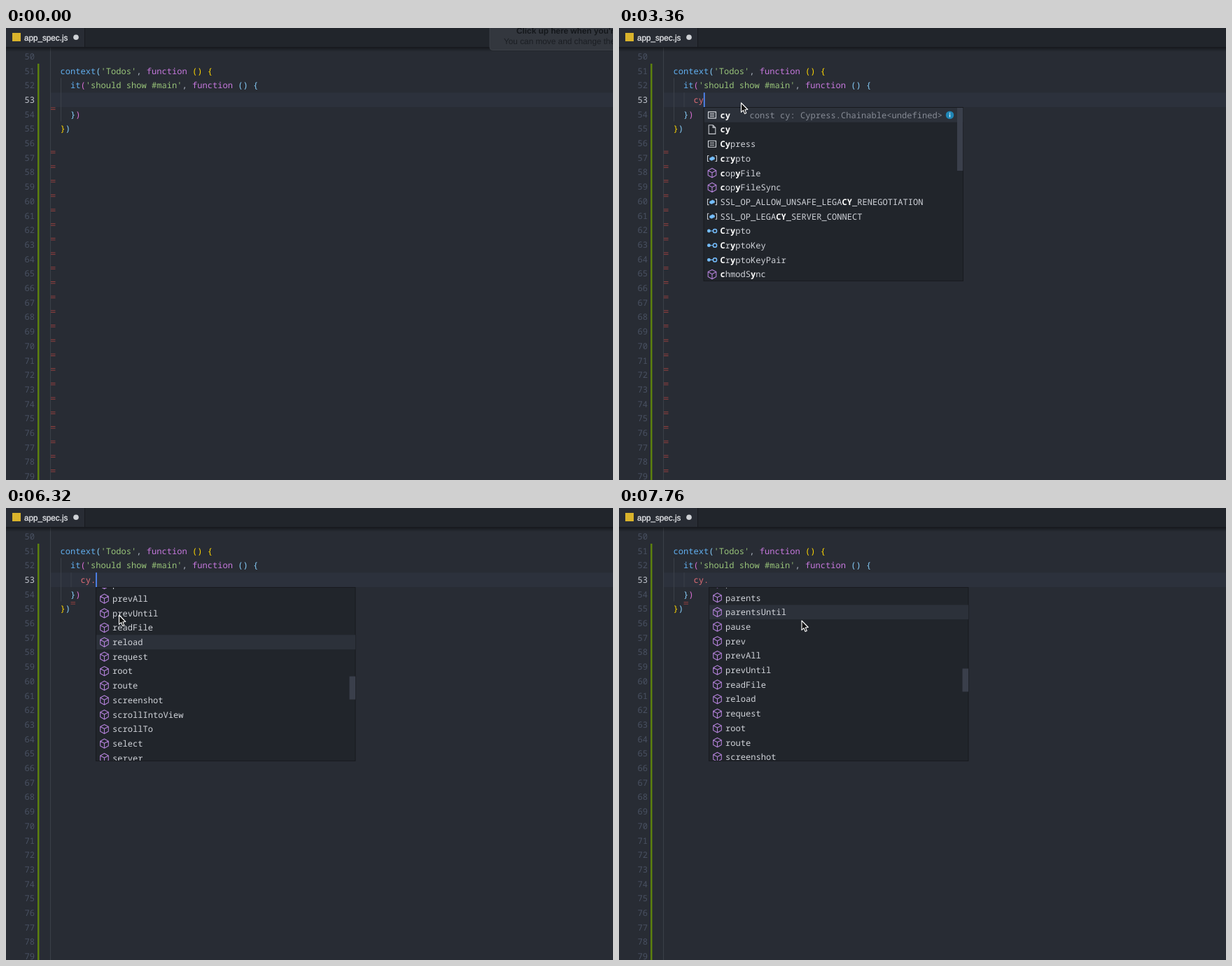
Animation of 867x646 px, one loop 8 s. Source, as an HTML page:

```html
<!DOCTYPE html>
<html lang="en">
<head>
<meta charset="utf-8">
<title>Editor autocomplete</title>
<style>
html, body { margin: 0; width: 100%; height: 100%; overflow: hidden; background: #282c34; }
svg { display: block; }
text { white-space: pre; text-rendering: geometricPrecision; font: 500 12.08px "Noto Sans Mono", "DejaVu Sans Mono", monospace; }
.ui { font-family: "Liberation Sans", Arial, sans-serif; font-weight: 400; }
.num { font-weight: 400; }
</style>
</head>
<body>
<svg id="stage" width="867" height="646" viewBox="0 0 867 646">
  <defs>
    <linearGradient id="shade" x2="0" y2="1">
      <stop offset="0" stop-color="#000" stop-opacity=".4"/>
      <stop offset="1" stop-color="#000" stop-opacity="0"/>
    </linearGradient>
  </defs>
</svg>
<script>
const LOOP = 8000, STEP = 80, LINE = 20.7, CHAR = 7.25;
const stage = document.getElementById('stage');
const C = {
  blue: '#61afef', sky: '#87cefa', gold: '#ffd700', pink: '#da70d6', purple: '#c678dd',
  green: '#98c379', red: '#e06c75', grey: '#abb2bf', cube: '#b180d7', icon: '#75beff',
  panel: '#21252b', row: '#2c313a', edge: '#181a1f', mark: '#93403f'
};

function el(parent, tag, attrs, content) {
  const node = document.createElementNS('http://www.w3.org/2000/svg', tag);
  for (const k in attrs) node.setAttribute(k, attrs[k]);
  if (content !== undefined) node.textContent = content;
  parent.append(node);
  return node;
}
const rect = (p, x, y, width, height, fill) => el(p, 'rect', { x, y, width, height, fill });
const path = (p, d, stroke, fill = 'none', width = 1.1) =>
  el(p, 'path', { d, stroke, fill, 'stroke-width': width, 'stroke-linejoin': 'round' });
const text = (p, x, mid, fill, s, more) => el(p, 'text', { x, y: mid + 4.3, fill, ...more }, s);
const midOf = n => 40.5 + LINE * (n - 50);
const show = (node, on) => node.setAttribute('visibility', on ? 'visible' : 'hidden');
const move = (node, x, y) => node.setAttribute('transform', `translate(${x} ${y})`);

function tokens(x, line, parts) {
  const node = text(stage, x, midOf(line), C.grey, '');
  for (const [fill, s] of parts) el(node, 'tspan', { fill }, s);
}
function mark(p, x, y) {
  rect(p, x, y - 1.5, 6.5, 1, C.mark);
  rect(p, x, y + 1, 6.5, 1, C.mark);
}

// Editor
rect(stage, 0, 0, 867, 646, '#282c34');
rect(stage, 64, 92.3, 803, LINE, '#2c313c');
rect(stage, 63, 28, 1, 618, '#3b4048');
rect(stage, 45, 51, 2.5, 595, '#5c800e');
rect(stage, 78, 71.5, 1, 62, '#3b4048');
const guide = rect(stage, 92.5, 92.3, 1, LINE, '#3b4048');
for (let n = 50; n < 80; n++)
  text(stage, 41, midOf(n), n === 53 ? '#c2c6ce' : '#495162', n, { 'text-anchor': 'end', class: 'num' });

const lineMark = el(stage, 'g'), wordMark = el(stage, 'g'), blankMarks = el(stage, 'g'), endMark = el(stage, 'g');
mark(lineMark, 64, 115);
mark(wordMark, 107, 115);
mark(endMark, 92.5, 135.7);
for (let n = 56; n < 79; n++) mark(blankMarks, 64, midOf(n) + 12.5);

tokens(77.6, 51, [[C.blue, 'context'], [C.sky, '('], [C.green, "'Todos'"], [C.grey, ', '],
  [C.purple, 'function '], [C.gold, '() {']]);
tokens(92.1, 52, [[C.blue, 'it'], [C.pink, '('], [C.green, "'should show #main'"], [C.grey, ', '],
  [C.purple, 'function '], [C.sky, '() {']]);
tokens(92.1, 54, [[C.sky, '}'], [C.pink, ')']]);
tokens(77.6, 55, [[C.gold, '}'], [C.sky, ')']]);
const typed = text(stage, 106.6, midOf(53), C.red, '');
const caret = rect(stage, 0, 92.3, 1.7, LINE, '#528bff');

// Tab bar
rect(stage, 0, 28, 867, 6, 'url(#shade)');
rect(stage, 0, 0, 867, 28, C.panel);
rect(stage, 0, 0, 112, 28, '#282c34');
rect(stage, 112, 0, 1, 28, C.edge);
rect(stage, 0, 27, 867, 1, C.edge);
rect(stage, 9, 7, 12, 12, '#d9b32c');
text(stage, 26, 13.3, '#e6e8eb', 'app_spec.js',
  { class: 'ui', style: 'font-size:11.7px', stroke: '#e6e8eb', 'stroke-width': .3 });
el(stage, 'circle', { cx: 100, cy: 13.3, r: 3.8, fill: '#cfd2d6' });

// Fading hint
const hint = el(stage, 'g');
el(hint, 'rect', { x: 691, y: -8, width: 190, height: 39.5, rx: 4, fill: '#33373e', stroke: '#3d4148' });
text(hint, 729, 4, '#15181c', "Click up here when you're", { class: 'ui', style: 'font-weight:700;font-size:11.8px' });
text(hint, 711, 18.5, '#1b1e23', 'You can move and change the', { class: 'ui', style: 'font-size:11.8px' });

// Icons, centred on 0,0
const icons = {
  cube(g) {
    path(g, 'M0-6.6L5.8-3.5V3.3L0 6.6L-5.8 3.3V-3.5ZM-5.8-3.5L0-.4L5.8-3.5M0-.4V6.6', C.cube);
  },
  constant(g) {
    path(g, 'M-5.5-4.5H5.5V4.5H-5.5ZM-3.2-1.5H3.2M-3.2 1.5H3.2', '#d7dae0');
  },
  file(g) {
    path(g, 'M-4.8-6.3H1.2L4.8-2.7V6.3H-4.8ZM1.2-6.3V-2.7H4.8', '#c5c8ce');
  },
  variable(g) {
    path(g, 'M-4.5-4H-6.5V4H-4.5M4.5-4H6.5V4H4.5', '#c5c8ce');
    path(g, 'M-3.5-.6L.8-2.8L3.5-1.2V1L-.8 3L-3.5 1.6Z', C.icon, C.icon, .5);
  },
  type(g) {
    el(g, 'circle', { cx: -4.6, cy: 0, r: 2.4, fill: C.icon });
    el(g, 'circle', { cx: 4, cy: 0, r: 2.6, fill: 'none', stroke: C.icon, 'stroke-width': 1.5 });
    path(g, 'M-3 0H1.5', C.icon);
  },
  field(g) {
    path(g, 'M-6.5-1.2L.8-4.6L6.5-2V1.6L-.8 5L-6.5 2.4Z', C.icon, C.icon, .5);
    path(g, 'M-6.2-1L-.8 1.4L6.2-1.8', '#2f6fa5', 'none', .8);
  }
};

// Letters of the label that match the typed word
function hits(label) {
  const at = label.search(/cy/i);
  return at >= 0 ? [at, at + 1] : [label.search(/c/i), label.search(/y/i)];
}

function popup(x, items, first, barHeight, match) {
  const root = el(stage, 'g');
  el(root, 'rect', { x: x - .5, y: 113.5, width: 370.5, height: 248, fill: C.panel, stroke: C.edge });
  const view = el(root, 'svg', { x, y: 114, width: 370, height: 247, overflow: 'hidden' });
  const list = el(view, 'g');
  const focus = rect(list, 0, 0, 370, LINE, C.row);
  const hover = rect(list, 0, 0, 370, LINE, C.row);
  items.forEach(([icon, label], i) => {
    const mid = 10.4 + LINE * (i + first);
    const g = el(list, 'g');
    move(g, 11.5, mid);
    icons[icon](g);
    const node = text(list, 23, mid, '#d0d3d9', '');
    const bold = match ? hits(label) : [];
    [...label].forEach((ch, k) => el(node, 'tspan',
      bold.includes(k) ? { fill: '#fff', style: 'font-weight:700' } : {}, ch));
  });
  const bar = rect(view, 361.5, 0, 8.5, barHeight, '#3a3f4b');
  return { root, list, focus, hover, bar };
}

function detail(p, x, row, s, iconX) {
  const g = el(p, 'g'), mid = 10.4 + LINE * row;
  text(g, x, mid, '#868b95', s);
  el(g, 'circle', { cx: iconX, cy: mid, r: 5.7, fill: '#1f85b5' });
  rect(g, iconX - .7, mid - 1, 1.4, 4, '#dcecf5');
  rect(g, iconX - .7, mid - 3.3, 1.4, 1.4, '#dcecf5');
  return g;
}

const words = popup(121.5, [
  ['constant', 'cy'], ['file', 'cy'], ['constant', 'Cypress'], ['variable', 'crypto'],
  ['cube', 'copyFile'], ['cube', 'copyFileSync'],
  ['variable', 'SSL_OP_ALLOW_UNSAFE_LEGACY_RENEGOTIATION'], ['variable', 'SSL_OP_LEGACY_SERVER_CONNECT'],
  ['type', 'Crypto'], ['type', 'CryptoKey'], ['type', 'CryptoKeyPair'], ['cube', 'chmodSync']
], 0, 90, true);
show(words.hover, false);
const wordsInfo = detail(words.list, 65, 0, 'const cy: Cypress.Chainable<undefined>', 351);

const names = 'parent parents parentsUntil pause prev prevAll prevUntil readFile reload request root route ' +
  'screenshot scrollIntoView scrollTo select server setCookie should';
const members = popup(129, names.split(' ').map(n => [n === 'should' ? 'field' : 'cube', n]), -7, 33);
members.focus.setAttribute('y', LINE * 11);
detail(members.list, 79.5, 11, '(property) Cypress.Chainable<undefi…', 351);

const pointer = el(stage, 'g');
path(pointer, 'M0 0V13.4L3 10.7L5.1 15.6L7.3 14.6L5.3 9.9L9.3 9.5Z', '#fff', '#111', 1.1);

// Steps: [time, value, ...]
const typing = [[0, ''], [2560, 'c'], [2960, 'cy'], [3440, 'cy.']];
const hovering = [[0, null], [4640, 0], [4720, 1], [7200, -5]];
const blinks = [1200, 1600, 2080, 3920, 4400, 4880, 5360, 5840, 6320, 6800, 7280, 7760];
const pointing = [[320, 678, 19], [400, 615, 28], [480, 520, 45], [640, 320, 80], [800, 205, 102], [960, 174.5, 107],
  [4480, 174.5, 107], [4640, 172, 120], [4720, 168, 136], [4800, 164, 147], [4880, 161.5, 153],
  [7120, 161.5, 153], [7280, 178, 153], [7520, 236, 158], [7680, 258, 161], [7760, 261, 161]];
const scrolling = [[6080, 0], [6160, 8], [6240, 25], [6320, 46.7], [6400, 69], [6480, 89],
  [6560, 105], [6640, 117], [6720, 124.5], [6800, 128]];

const hold = (steps, t) => steps.filter(s => s[0] <= t).pop()[1];
function glide(steps, t) {
  const i = steps.findIndex(s => s[0] > t);
  if (i < 0) return steps[steps.length - 1].slice(1);
  if (i === 0) return steps[0].slice(1);
  const a = steps[i - 1], b = steps[i], u = (t - a[0]) / (b[0] - a[0]);
  return a.slice(1).map((v, k) => v + (b[k + 1] - v) * u);
}

function draw(t) {
  show(hint, t < 80);
  const word = hold(typing, t);
  typed.textContent = word;
  show(guide, word);
  caret.setAttribute('x', 106.4 + CHAR * word.length);
  show(caret, blinks.filter(b => b <= t).length % 2);

  show(lineMark, t < 2800);
  show(wordMark, t >= 2800 && t < 2960);
  show(blankMarks, t < 3680);
  show(endMark, t >= 3680);

  words.root.style.display = t >= 3040 && t < 3440 ? '' : 'none';
  wordsInfo.style.display = t >= 3360 ? '' : 'none';

  members.root.style.display = t >= 3520 ? '' : 'none';
  const [scroll] = glide(scrolling, t);
  move(members.list, 0, scroll);
  members.bar.setAttribute('y', 133 - scroll * .1367);
  const row = hold(hovering, t);
  members.hover.style.display = row === null ? 'none' : '';
  members.hover.setAttribute('y', LINE * row);

  show(pointer, t >= 320);
  move(pointer, ...glide(pointing, t));
}

const start = performance.now();
function tick(now) {
  const t = Math.max(0, now - start) % LOOP;
  draw(Math.floor(t / STEP) * STEP);
  requestAnimationFrame(tick);
}
draw(0);
requestAnimationFrame(tick);
</script>
</body>
</html>
```
